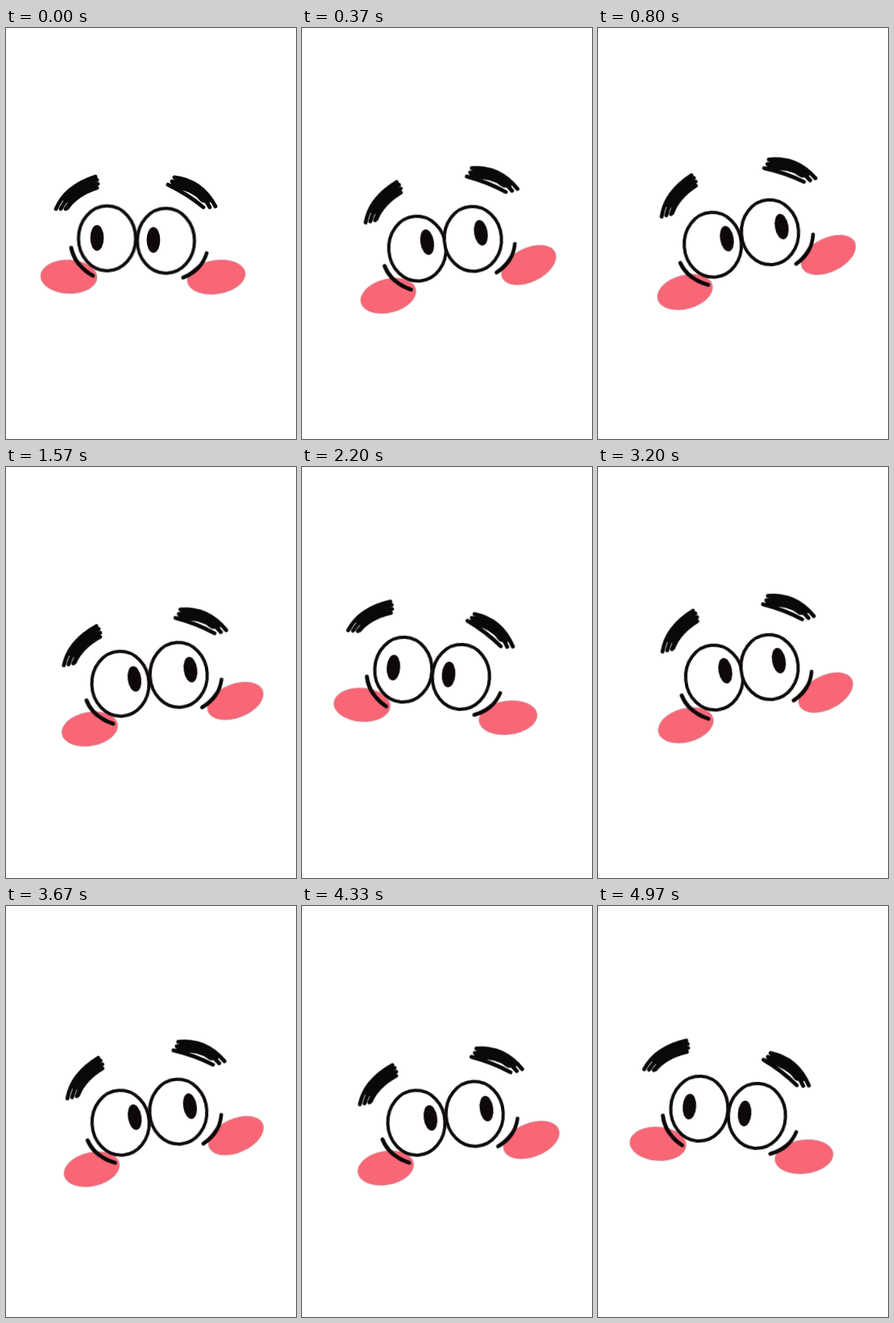
An HTML page without scripts that plays this animation: 360 px wide and 509 px high, repeating every 5 s.

```html
<!DOCTYPE html>
<html lang="en">
<head>
<meta charset="utf-8">
<title>Wobbling face</title>
<style>
html, body { margin: 0; width: 100%; height: 100%; overflow: hidden; background: #fff; }
svg { display: block; width: 100vw; height: 100vh; }

.ink { fill: none; stroke: #0b0808; stroke-width: 4.8; stroke-linecap: round; stroke-linejoin: round; }
.body { stroke-width: 13; }
.eye { fill: #fff; stroke: #0f0a0b; stroke-width: 4; }
.pupil { fill: #0f0809; }
.blush { fill: #f96676; stroke: #c4838f; stroke-width: .7; }

/* Each part carries five poses:
   --a settled left, --e arriving right, --b easing right, --c settled right, --d arriving left */
.part { animation: pose 5s ease-in-out infinite; }
@keyframes pose {
  0%, 4.6%, 55.34%, 59.94% { transform: var(--a); }
  8%, 8.67%, 63.34%, 64% { transform: var(--e); }
  16%, 71.34% { transform: var(--b); animation-timing-function: ease-out; }
  24%, 36%, 79.34%, 91.34% { transform: var(--c); }
  40%, 44%, 95.34%, 100% { transform: var(--d); }
}

/* Shared wind-up, dip and overshoot */
.head { animation: bob 5s ease-in-out infinite; }
@keyframes bob {
  0%, 16%, 31.4%, 44%, 55.34%, 71.34%, 86.74%, 99.4%, 100% { transform: translate(0, 0); }
  4.6%, 59.94% { transform: translate(-6px, 13px); }
  6.8%, 62.14% { transform: translate(0, 17px); animation-timing-function: linear; }
  8%, 63.34% { transform: translate(0, 8px); animation-timing-function: linear; }
  8.67%, 64% { transform: translate(0, 0); animation-timing-function: ease-out; }
  10.2%, 65.54% { transform: translate(0, -6px); }
  36%, 91.34% { transform: translate(6px, 13px); }
  38.2%, 93.54% { transform: translate(0, 15px); animation-timing-function: linear; }
  39.4%, 94.74% { transform: translate(2px, 7px); animation-timing-function: linear; }
  40.2%, 95.54% { transform: translate(1px, 0); animation-timing-function: ease-out; }
  42%, 97.34% { transform: translate(0, -4px); }
}

#blushL {
  --a: translate(78px, 308px) rotate(2deg);
  --e: translate(109px, 320px) rotate(-15deg);
  --b: translate(108px, 327px) rotate(-15deg);
  --c: translate(104px, 324.5px) rotate(-10deg);
  --d: translate(74.5px, 294.5px) rotate(4deg);
}
#blushR {
  --a: translate(261px, 308.5px) rotate(-9deg);
  --e: translate(282.7px, 279.5px) rotate(-27deg);
  --b: translate(286px, 281px) rotate(-26deg);
  --c: translate(284.7px, 289.7px) rotate(-21deg);
  --d: translate(255.8px, 310.5px) rotate(-7deg);
}
#eyeL {
  --a: translate(125.5px, 260.5px) rotate(0deg);
  --e: translate(144.3px, 261px) rotate(-5deg);
  --b: translate(142.5px, 268.5px) rotate(-4deg);
  --c: translate(142px, 268.5px) rotate(-2deg);
  --d: translate(125.8px, 251px) rotate(3deg);
}
#eyeR {
  --a: translate(198.5px, 263.5px) rotate(0deg);
  --e: translate(213px, 248px) rotate(-5deg);
  --b: translate(213.5px, 253px) rotate(-4deg);
  --c: translate(214.3px, 257.5px) rotate(-3deg);
  --d: translate(197.3px, 260px) rotate(3deg);
}
#pupilL {
  --a: translate(113px, 260px) rotate(0deg);
  --e: translate(158px, 252.5px) rotate(-10deg);
  --b: translate(160px, 261px) rotate(-10deg);
  --c: translate(159.5px, 262.5px) rotate(-8deg);
  --d: translate(113.5px, 248.5px) rotate(4deg);
}
#pupilR {
  --a: translate(183px, 262.5px) rotate(0deg);
  --e: translate(224.5px, 240px) rotate(-10deg);
  --b: translate(228px, 246px) rotate(-10deg);
  --c: translate(229px, 251px) rotate(-8deg);
  --d: translate(182px, 257px) rotate(4deg);
}
#cheekL {
  --a: translate(94.5px, 289.5px) rotate(52deg);
  --e: translate(120.5px, 297.5px) rotate(41deg);
  --b: translate(119.5px, 304.5px) rotate(38deg);
  --c: translate(116.5px, 303.5px) rotate(41deg);
  --d: translate(92.5px, 278px) rotate(57deg);
}
#cheekR {
  --a: translate(234.5px, 294px) rotate(-46deg);
  --e: translate(254px, 271.5px) rotate(-58deg);
  --b: translate(256.5px, 274px) rotate(-60deg);
  --c: translate(255.5px, 280.5px) rotate(-55deg);
  --d: translate(230px, 293.5px) rotate(-40deg);
}
#browL {
  --a: translate(88px, 204px) rotate(0deg);
  --e: translate(100.5px, 203px) rotate(-14deg);
  --b: translate(99px, 207.5px) rotate(-15deg);
  --c: translate(93.5px, 221px) rotate(-11deg);
  --d: translate(85px, 184.5px) rotate(5deg);
}
#browR {
  --a: translate(231px, 203px) rotate(0deg);
  --e: translate(236px, 173px) rotate(-11.5deg);
  --b: translate(237.6px, 175.3px) rotate(-13.5deg);
  --c: translate(241.5px, 190px) rotate(-11deg);
  --d: translate(234.5px, 202px) rotate(5deg);
}
</style>
</head>
<body>
<svg viewBox="0 0 360 509">
  <g class="head">
    <ellipse id="blushL" class="part blush" rx="35" ry="20.8"/>
    <ellipse id="blushR" class="part blush" rx="36.3" ry="20.8"/>
    <ellipse id="eyeL" class="part eye" rx="35.5" ry="40.2"/>
    <ellipse id="eyeR" class="part eye" rx="35.5" ry="40.2"/>
    <ellipse id="pupilL" class="part pupil" rx="8.4" ry="15.9"/>
    <ellipse id="pupilR" class="part pupil" rx="8.4" ry="15.9"/>
    <path id="cheekL" class="part ink" d="M-22 0Q-2 10 22 0"/>
    <path id="cheekR" class="part ink" d="M-21 0Q2 10 21 0"/>
    <g id="browL" class="part ink">
      <path d="M-26 20Q-14-8 23-20M-20 20Q-8-4 25-16M-14 20Q0-2 26-11M-12 19Q0 2 25-6"/>
      <path class="body" d="M-12 6Q-2-5 18-12"/>
    </g>
    <g id="browR" class="part ink">
      <path d="M-22-18Q12-14 29 18M-25-13Q6-10 22 19M-30-9Q-5 3 14 19M-24-10Q4-6 20 12"/>
      <path class="body" d="M-18-10Q4-7 15 7"/>
    </g>
  </g>
</svg>
</body>
</html>
```
